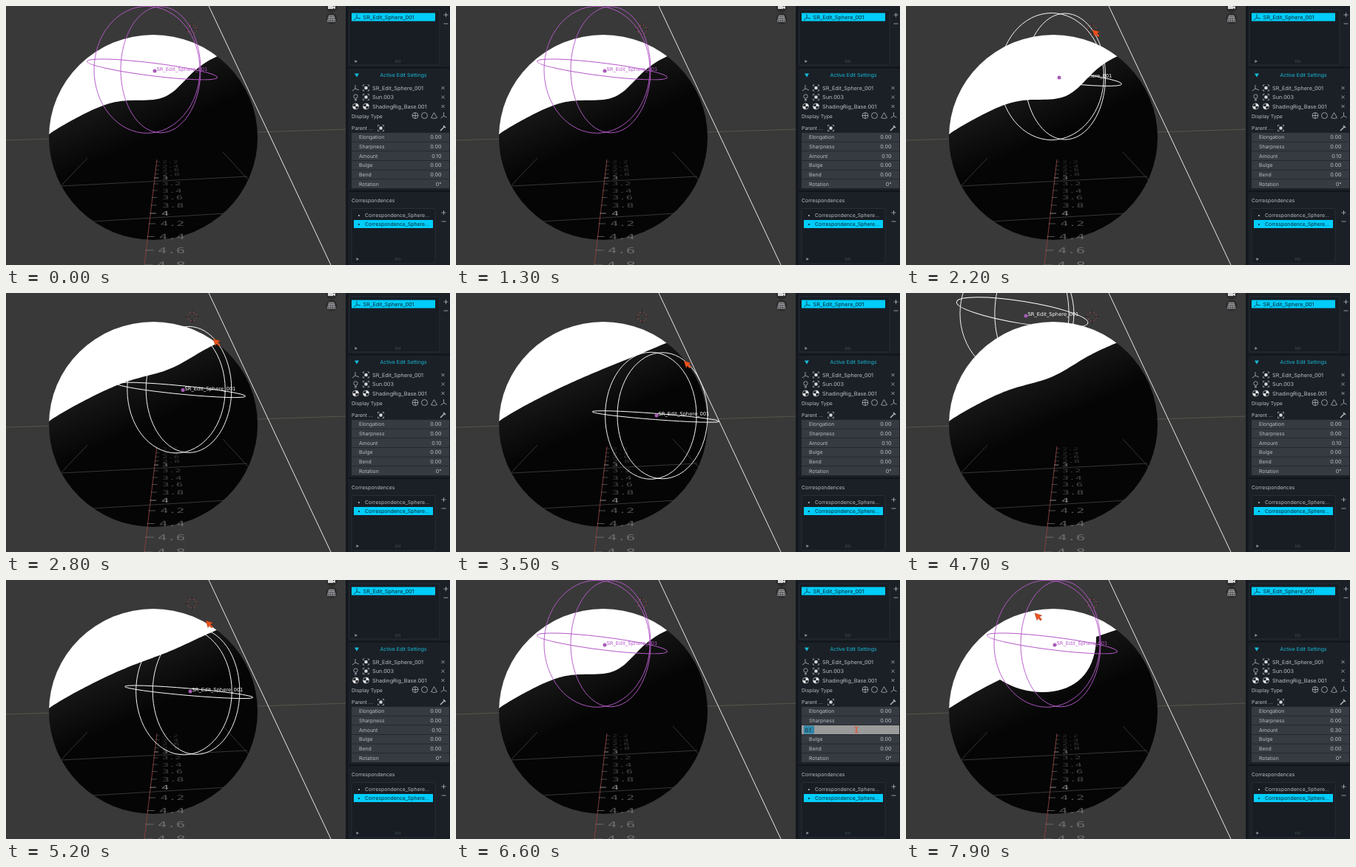
Animation of 600 by 351 pixels, one loop 8000 ms. Source, as an HTML page:

```html
<!DOCTYPE html>
<html lang="en">
<head>
<meta charset="utf-8">
<title>Shading rig edit</title>
<style>
html, body { margin: 0; width: 100%; height: 100%; overflow: hidden; background: #393939; }
svg { display: block; width: 100vw; height: 100vh; }
text { font: 6.9px Inter, "Open Sans", sans-serif; fill: #b9bcc1; text-rendering: geometricPrecision; }
.name { font-size: 7.3px; }
.dark { fill: #06242c; }
.cyan { fill: #16bcd8; }
.end { font-size: 7.2px; text-anchor: end; }
.tick { font: 12px "DejaVu Sans Mono", monospace; fill: #8a8a8a; }
.tag { font: 6.75px "DejaVu Sans", sans-serif; fill: inherit; stroke: none; }
.icon { fill: none; stroke: #b4b7bc; stroke-width: .8; }
.box { fill: #181d24; stroke: #2b313a; stroke-width: .8; }
</style>
</head>
<body>
<svg viewBox="0 0 600 351" preserveAspectRatio="none">
  <defs>
    <clipPath id="ball"><ellipse cx="199" cy="178" rx="141" ry="139"/></clipPath>
    <clipPath id="view"><rect width="460" height="351"/></clipPath>
    <linearGradient id="sheen" gradientUnits="userSpaceOnUse" x1="172" y1="115" x2="200" y2="175">
      <stop stop-color="#161616"/><stop offset="1" stop-color="#050505"/>
    </linearGradient>
  </defs>
  <g clip-path="url(#view)">
    <rect width="460" height="351" fill="#393939"/>
    <path d="M0 182L460 167" stroke="#565b4d" stroke-width=".9"/>
    <ellipse cx="199" cy="178" rx="141" ry="139" fill="url(#sheen)"/>
    <path id="lit" fill="#fff" clip-path="url(#ball)"/>
    <g fill="none" stroke="#3b3b3b" stroke-width=".9">
      <path d="M75 244L326 231M84 294L314 280M110 206L75 243M293 198L328 236"/>
      <path d="M204 208L187 351" stroke="#8c3f3d"/>
    </g>
    <g id="ruler"></g>
    <path d="M274 0L439 351" stroke="#e6e6e6"/>
    <g fill="none" stroke-width=".9">
      <circle cx="251.500" cy="32" r="6" stroke="#a8494b" stroke-dasharray="2.4 2.3"/>
      <path d="M251.500 23v5M251.500 36v5M242.500 32h5M255.500 32h5" stroke="#222"/>
    </g>
    <g id="gizmo">
      <g fill="none" stroke-width=".95"><ellipse id="ringA"/><ellipse id="ringB"/><ellipse id="ringC"/></g>
      <circle id="dot" r="2.500" fill="#a65cb6" stroke="none"/>
      <text id="tag" class="tag">SR_Edit_Sphere_001</text>
    </g>
    <g fill="#2b2b2b"><circle cx="440" cy="1" r="7.500"/><circle cx="440" cy="17" r="7.500"/></g>
    <path d="M435 0h7v4h-7zM442 1l3-1v4l-3-1z" fill="#d8d8d8"/>
    <path d="M436.500 13h6.500l2 8h-10.500zM436 15.700h8M435 18.300h9.500M439.800 13v8M438 13l-1 8M441.600 13l1 8" class="icon"/>
  </g>
  <g id="panel">
    <rect x="459" width="141" height="351" fill="#1b2027"/>
    <rect x="459" width="3.500" height="351" fill="#14181e"/>
    <path d="M463 83.500h137M463 251h137" stroke="#11151a" stroke-width="2"/>
    <rect class="box" x="464" y="5" width="122" height="75" rx="2"/>
    <rect x="467" y="9.500" width="113" height="11" fill="#00cdfa"/>
    <rect class="box" x="467" y="274.500" width="113" height="74.500" rx="2"/>
    <rect x="470" y="290" width="107" height="11" fill="#00cdfa"/>
    <path d="M471 91.500h6l-3 5z" class="cyan"/>
    <path d="M471.500 73l3.500 2-3.500 2zM473.500 341l3.500 2-3.500 2z" fill="#8b9098"/>
    <path d="M526 74h7M526 76h7M526 342h7M526 344h7" stroke="#50565f" stroke-dasharray="1 1"/>
    <path class="icon" d="M591.500 12h6M594.500 9v6M591.500 24h6M588.500 280h6M591.500 277v6M588.500 292h6"/>
    <path class="icon" d="M588.500 109l4 4m0-4l-4 4M588.500 121.500l4 4m0-4l-4 4M588.500 134l4 4m0-4l-4 4"/>
    <path class="icon" d="M472 107v5l-4 3M472 112l5 2M591.500 144v5l-4 3M591.500 149l4 2"/>
    <path class="icon" style="stroke:#073039" d="M474 11v5l-4 3M474 16l5 1"/>
    <g id="cubes"></g>
    <g class="icon">
      <circle cx="472.500" cy="122.500" r="2.700"/><path d="M471 126.500h3M471 128h3"/>
      <circle cx="472.500" cy="136" r="4"/><circle cx="486.500" cy="136" r="4"/>
      <circle cx="553" cy="148.500" r="4"/><path d="M549 148.500h8M553 144.500v8"/>
      <circle cx="565.500" cy="148.500" r="4"/>
      <path d="M578.500 144.500l-4 7q4 2 8 0z"/>
      <path d="M587 169l5-5M591 162l3 3" stroke-width="1.500"/>
    </g>
    <path d="M472.500 136v-4a4 4 0 0 1 4 4zv4a4 4 0 0 1-4-4zM486.500 136v-4a4 4 0 0 1 4 4zv4a4 4 0 0 1-4-4z" fill="#e4e4e4"/>
  </g>
  <g id="edit">
    <rect x="467" y="197" width="132" height="12" fill="#9b9b9b"/>
    <rect id="pick" x="470" y="197.500" width="13" height="11" fill="#2f87a8"/>
    <text id="typed" x="471.500" y="205.500" style="fill:#142027"></text>
    <path d="M483.500 198v10" stroke="#2479a0"/>
  </g>
  <path id="beam" d="M-2.500-4q2.500 0 2.500 1.500v5q0 1.500-2.500 1.500M2.500-4q-2.500 0-2.500 1.500v5q0 1.500 2.500 1.500" fill="none" stroke="#e0512e"/>
  <path id="arrow" d="M0 0L9.500 3 6.300 5 9.500 8.300 7.700 10 4.500 6.800 3 9.500z" fill="#f0521d" stroke="#8d3013" stroke-width=".5"/>
</svg>
<script>
const LOOP = 8000, STEP = 100;
const GRAB = 2000, RELEASE = 5700, OPEN = 6400, COMMIT = 7300;
const $ = id => document.getElementById(id);

function add(parent, tag, attrs, text) {
  const el = document.createElementNS("http://www.w3.org/2000/svg", tag);
  set(el, attrs);
  if (text) el.textContent = text;
  $(parent).append(el);
  return el;
}
function set(el, attrs) {
  for (const key in attrs) el.setAttribute(key, attrs[key]);
}
const label = (x, y, text, cls = "") => add("panel", "text", { x, y: y + 2.5, class: cls }, text);

// Static panel content
label(482.5, 15, "SR_Edit_Sphere_001", "name dark");
label(505.5, 93.5, "Active Edit Settings", "cyan");
label(495, 111, "SR_Edit_Sphere_001", "name");
label(495, 123.5, "Sun.003", "name");
label(495, 136, "ShadingRig_Base.001", "name");
label(467, 149, "Display Type");
label(467, 165.5, "Parent ...");
label(467, 263, "Correspondences");
label(475, 283, "•");
label(485, 283, "Correspondence_Sphere...");
label(475, 295.5, "•", "dark");
label(485, 295.5, "Correspondence_Sphere...", "dark");

const values = ["Elongation", "Sharpness", "Amount", "Bulge", "Bend", "Rotation"].map((name, i) => {
  const y = 177.8 + i * 12.65;
  add("panel", "rect", { x: 467, y: y - 6, width: 132, height: 12, fill: "#363a41" });
  label(477, y, name);
  return label(588.5, y, name === "Rotation" ? "0°" : "0.00", "end");
});

for (const [x, y] of [[486.5, 111], [486.5, 123.5], [506.5, 165.5]]) {
  add("cubes", "rect", { x: x - 2, y: y - 2, width: 4, height: 4, fill: "#d5d8dc" });
  add("cubes", "path", { d: `M${x - 4} ${y - 2}v-2h2m4 0h2v2m0 4v2h-2m-4 0h-2v-2`, class: "icon" });
}

// Floor ruler in perspective
[211, 216.5, 222, 227.5, 233, 241, 250, 259.5, 270, 281, 295, 312.5, 331, 351].forEach((y, i) => {
  const size = 0.55 + (y - 208) / 190, whole = i === 4 || i === 9;
  const axis = 204 - (y - 208) * 0.119, len = 5 + (y - 208) * 0.05;
  const x = 211 - Math.max(0, y - 270) * 0.1;
  const value = (2.2 + i * 0.2).toFixed(whole ? 0 : 1);
  const opacity = whole ? 0.95 : 0.3 + i * 0.027;
  add("ruler", "path", { d: `M${axis - 1} ${y}h${len}`, stroke: "#8a8a8a", opacity });
  add("ruler", "text", {
    class: "tick", opacity,
    transform: `translate(${x} ${y + 3.4 * size}) scale(${0.35 + size * 1.15} ${size * 0.75})`
  }, value);
});

// Each key is [time, x, y]
const center = [
  [0, 201, 88], [GRAB, 201, 88], [2200, 207, 97], [3400, 271, 166], [3600, 271, 166],
  [4600, 163, 32], [4700, 162, 31], [5200, 249, 151], [5600, 215, 106], [RELEASE, 201, 88]
];
const pointer = [
  [0, 330, -30], [1200, 330, -30], [1900, 247, 23], [2200, 252, 32], [3400, 308, 92],
  [3600, 308, 92], [4700, 185, -50], [5200, 270, 55], [5700, 250, 30], [6300, 541, 203],
  [COMMIT, 541, 203], [7800, 174, 45], [LOOP, 174, 45]
];

function at(keys, t) {
  const i = keys.findIndex(k => k[0] > t);
  if (i < 0) return keys[keys.length - 1].slice(1);
  const [t0, x0, y0] = keys[i - 1], [t1, x1, y1] = keys[i];
  const p = (t - t0) / (t1 - t0), e = p * p * (3 - 2 * p);
  return [x0 + (x1 - x0) * e, y0 + (y1 - y0) * e];
}

// Light border: a shallow arc pushed outward near the gizmo
function border(cx, cy) {
  const ux = 0.905, uy = -0.425, x0 = 58, y0 = 174, span = 252;
  const mid = (cx - x0) * ux + (cy - y0) * uy - 3;
  const away = (x0 - cx) * uy + (cy - y0) * ux + 13;
  const amp = 25 * Math.exp(-0.5 * (away / (away < 0 ? 52 : 36)) ** 2);
  let d = "M0 0L";
  for (let s = 0; s <= span; s += 4) {
    const bow = 6 * Math.sin(Math.PI * (s / span) ** 0.75);
    const off = amp * Math.exp(-0.5 * ((s - mid) / 34) ** 2) - bow;
    d += `${(x0 + s * ux - off * uy).toFixed(1)} ${(y0 + s * uy + off * ux).toFixed(1)} `;
  }
  return d + "L286 0Z";
}
const STRONG = "M0 0L58 174Q92 152 127 135C146 147 165 152 185 152C228 152 257 126 257 77L286 67V0Z";

function ring(id, left, right, cy, ry) {
  set($(id), { cx: (left + right) / 2, cy, rx: (right - left) / 2, ry });
}

// Perspective widens, flattens and tilts the rings with the position
function drawGizmo(cx, cy, grabbed) {
  const dx = cx - 201, dy = cy - 88, color = grabbed ? "#fff" : "#b65ac9";
  const upright = cy - 1.7 + 0.025 * dy, level = cy - 2 + 0.042 * dy;
  ring("ringA", cx - 82 + 0.18 * dx, cx + 61 - 0.1 * dx, upright, 86);
  ring("ringB", cx - 46 - 0.1 * dx, cx + 62 + 0.1 * dx, upright, 85.5);
  ring("ringC", cx - 92 + 0.07 * dx, cx + 85, level, 8.7 * Math.exp(-dy / 105));
  set($("ringC"), { transform: `rotate(${7.1 - 0.035 * dy} ${cx - 3} ${level})` });
  set($("dot"), { cx, cy });
  set($("tag"), { x: cx + 2.5, y: cy });
  set($("gizmo"), { stroke: color, fill: color });
}

const show = (id, on) => set($(id), { visibility: on ? "visible" : "hidden" });

function draw(now) {
  const t = Math.floor(now % LOOP / STEP) * STEP;
  const [cx, cy] = at(center, t), [px, py] = at(pointer, t);
  const done = t >= COMMIT, editing = t >= OPEN && !done;
  drawGizmo(cx, cy, t >= GRAB && t < RELEASE);
  set($("lit"), { d: done ? STRONG : border(cx, cy) });

  values[2].textContent = done ? "0.30" : "0.10";
  show("edit", editing);
  show("pick", editing && t < 6900);
  $("typed").textContent = t < 6900 ? "0.1" : t < 7000 ? "0" : t < 7100 ? "0." : "0.3";

  const beam = t >= 6300 && !done;
  show("beam", beam);
  show("arrow", !beam);
  set($(beam ? "beam" : "arrow"), { transform: `translate(${px} ${py})` });
}

const start = performance.now();
function tick() {
  draw(performance.now() - start);
  requestAnimationFrame(tick);
}
tick();
</script>
</body>
</html>
```
